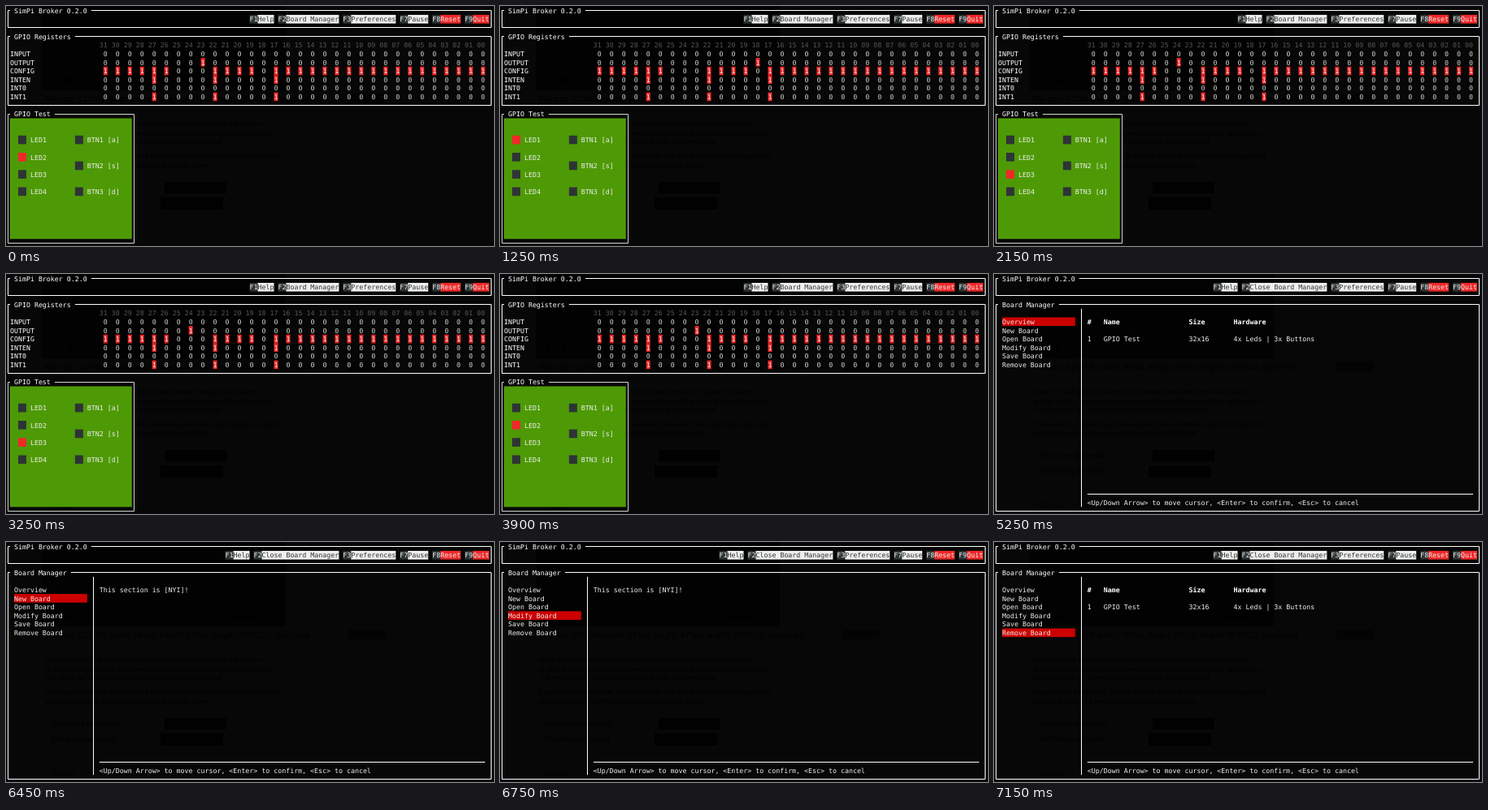
An HTML page that plays this animation: 600x296 px, repeating every 8000 ms.

```html
<!DOCTYPE html>
<html lang="en">
<head>
<meta charset="utf-8">
<title>GPIO terminal</title>
<style>
html, body { margin: 0; width: 100%; height: 100%; overflow: hidden; background: #070707; }
svg { display: block; width: 600px; height: 296px; }
text { white-space: pre; text-rendering: geometricPrecision; }
.term text { font: 8.292px "DejaVu Sans Mono", monospace; }
.term text.bold { font-weight: bold; }
.backdrop text { font-family: "Open Sans", sans-serif; }
</style>
</head>
<body>
<svg id="stage" viewBox="0 0 600 296"></svg>
<script>
const LOOP = 8000, COL = 4.992, ROW = 10.63, TOP = .3, BASELINE = 8.5;
const C = { bright: '#ffffff', white: '#eeeeec', light: '#d3d7cf', dim: '#555753', dark: '#2e3436',
            red: '#ef2929', select: '#cc0000', green: '#4e9a06' };

function add(parent, tag, attrs = {}, content) {
  const node = document.createElementNS('http://www.w3.org/2000/svg', tag);
  for (const key in attrs) node.setAttribute(key, attrs[key]);
  if (content !== undefined) node.textContent = content;
  parent.appendChild(node);
  return node;
}
const group = (parent, cls = '') => add(parent, 'g', { class: cls });
const show = (node, on) => node.setAttribute('visibility', on ? 'inherit' : 'hidden');

// Terminal helpers, all in character cells
const cellX = col => col * COL;
const cellY = row => TOP + row * ROW;
const midX = col => Math.floor(cellX(col + .5)) + .5;
const midY = row => Math.floor(cellY(row + .5)) + .5;
const label = (parent, col, row, str, fill = C.white, cls = '') =>
  add(parent, 'text', { x: cellX(col), y: cellY(row) + BASELINE, fill, class: cls }, str);
const block = (parent, col, row, cols, rows, fill) =>
  add(parent, 'rect', { x: cellX(col), y: cellY(row), width: cols * COL, height: rows * ROW, fill });
const line = (parent, d, stroke = C.bright) => add(parent, 'path', { d, fill: 'none', stroke });

function frame(parent, title, top, bottom, lastCol, stroke) {
  line(parent, `M${cellX(1)} ${midY(top)}H${midX(0)}V${midY(bottom)}H${midX(lastCol)}` +
               `V${midY(top)}H${cellX(title.length + 3)}`, stroke);
  label(parent, 2, top, title, C.bright);
}

function menu(parent, second) {
  const items = [['F1', 'Help'], ['F2', second], ['F3', 'Preferences'],
                 ['F7', 'Pause'], ['F8', 'Reset'], ['F9', 'Quit']];
  let col = 120 - items.reduce((sum, [, name]) => sum + name.length + 3, 0);
  for (const [key, name] of items) {
    const alert = key > 'F7';
    block(parent, col, 1, 2, 1, C.dark);
    label(parent, col, 1, key);
    block(parent, col + 2, 1, name.length, 1, alert ? C.red : C.white);
    label(parent, col + 2, 1, name, alert ? C.white : C.dark);
    col += name.length + 3;
  }
}

// The page that shimmers faintly through the terminal
function drawBackdrop(parent) {
  const box = (x, y, width, height, fill = '#010101') => add(parent, 'rect', { x, y, width, height, fill });
  const words = (x, y, size, str) => add(parent, 'text', { x, y, 'font-size': size, fill: '#000' }, str);
  box(0, 0, 600, 296, '#070707');
  box(44, 0, 300, 104, '#020202');
  add(parent, 'path', { d: 'M56 88l7 4-7 4z' });
  add(parent, 'circle', { cx: 78, cy: 92, r: 4 });
  add(parent, 'path', { d: 'M278 92h38M325 88h8v8h-8z', fill: 'none', stroke: '#000', 'stroke-width': 2 });
  words(48, 118, 9.5, 'File size: 3.21MiB, width: 961px, height: 471px, length: 00:00:22, type: mp4');
  box(421, 108, 46, 12, '#030303');
  words(48, 148, 8, 'Enter the start and end times in the boxes below, then press the button');
  words(48, 160, 8, 'or play the clip and use the current position to fill in both of the values here');
  words(48, 170, 8, 'The result will be shown below once the file has been read');
  words(48, 188, 8, 'If you want a smaller file, choose a lower size and frame rate before you start');
  words(48, 199, 8, 'and cut the clip to a few seconds so that it loads faster');
  words(55, 227, 9, 'Start time (seconds):');
  words(55, 246, 9, 'End time (seconds):');
  words(55, 288, 9, 'Output');
  box(195, 217, 76, 14);
  box(190, 236, 77, 15);
}

const svg = document.getElementById('stage');
drawBackdrop(group(svg, 'backdrop'));
const term = group(svg, 'term');
frame(term, 'SimPi Broker 0.2.0', 0, 2, 119);

// GPIO screen
const gpio = group(term);
menu(gpio, 'Board Manager');
frame(gpio, 'GPIO Registers', 3, 11, 119);
const bitCol = bit => 24 + 3 * (31 - bit);
const cells = {};
const interrupts = [27, 22, 17], outputs = [25, 24, 23, 18];
const registers = {
  INPUT: () => false,
  OUTPUT: () => false,
  CONFIG: bit => !outputs.includes(bit),
  INTEN: bit => interrupts.includes(bit),
  INT0: () => false,
  INT1: bit => interrupts.includes(bit)
};

function setBit(cell, on) {
  show(cell.back, on);
  cell.digit.textContent = on ? '1' : '0';
  cell.digit.setAttribute('fill', on ? C.white : C.light);
}

for (let bit = 0; bit < 32; bit++)
  label(gpio, bitCol(bit) - 1, 4, String(bit).padStart(2, '0'), C.dim);
Object.entries(registers).forEach(([name, isSet], i) => {
  label(gpio, 1, 5 + i, name, C.bright);
  cells[name] = Array.from({ length: 32 }, (_, bit) => {
    const cell = { back: block(gpio, bitCol(bit), 5 + i, 1, 1, C.red),
                   digit: label(gpio, bitCol(bit), 5 + i, '0') };
    setBit(cell, isSet(bit));
    return cell;
  });
});

frame(gpio, 'GPIO Test', 12, 27, 31, C.light);
block(gpio, 1, 13, 30, 14, C.green);
function lamp(col, row, name) {
  label(gpio, col + 3, row, name);
  return block(gpio, col, row, 2, 1, C.dark);
}
const leds = [18, 23, 24, 25].map((bit, i) => ({ bit, node: lamp(3, 15 + 2 * i, 'LED' + (i + 1)) }));
const buttons = [
  { bit: 22, key: 'a', from: 1650, to: 1850 },
  { bit: 27, key: 's', from: 2450, to: 2650 },
  { bit: 17, key: 'd', from: 3700, to: 3850 }
];
buttons.forEach((b, i) => { b.node = lamp(17, 15 + 3 * i, `BTN${i + 1} [${b.key}]`); });

// Board manager screen
const manager = group(term);
menu(manager, 'Close Board Manager');
frame(manager, 'Board Manager', 3, 27, 119);
line(manager, `M${midX(21)} ${cellY(4)}V${cellY(27)}M${cellX(23)} ${midY(25)}H${cellX(118)}`);
label(manager, 23, 26, '<Up/Down Arrow> to move cursor, <Enter> to confirm, <Esc> to cancel');
const cursor = block(manager, 2, 5, 18, 1, C.select);
['Overview', 'New Board', 'Open Board', 'Modify Board', 'Save Board', 'Remove Board']
  .forEach((name, i) => label(manager, 2, 5 + i, name));
const table = group(manager);
[[23, '#', '1'], [27, 'Name', 'GPIO Test'], [48, 'Size', '32x16'],
 [59, 'Hardware', '4x Leds | 3x Buttons']].forEach(([col, head, value]) => {
  label(table, col, 5, head, C.bright, 'bold');
  label(table, col, 7, value);
});
const notice = label(manager, 23, 5, 'This section is [NYI]!');

// Timeline: [time, value] pairs, each held until the next
const ledSteps = [[0, 1], [350, 2], [800, 3], [1250, 0], [1700, 1], [2150, 2],
                  [2650, 3], [3250, 2], [3900, 1], [4350, 0], [4800, 3]];
const cursorSteps = [[0, 0], [6450, 1], [6550, 2], [6750, 3], [6950, 4], [7150, 5]];
const MANAGER_OPENS = 5250;
const valueAt = (steps, t) => steps.filter(([start]) => start <= t).pop()[1];

function render(t) {
  const open = t >= MANAGER_OPENS;
  show(gpio, !open);
  show(manager, open);
  const lit = valueAt(ledSteps, t);
  leds.forEach(({ bit, node }, i) => {
    node.setAttribute('fill', i === lit ? C.red : C.dark);
    setBit(cells.OUTPUT[bit], i === lit);
  });
  for (const { bit, node, from, to } of buttons) {
    const pressed = t >= from && t < to;
    node.setAttribute('fill', pressed ? C.red : C.dark);
    setBit(cells.INPUT[bit], pressed);
  }
  const item = valueAt(cursorSteps, t);
  const listed = item === 0 || item === 5;
  cursor.setAttribute('y', cellY(5 + item));
  show(table, listed);
  show(notice, !listed);
}

const begin = performance.now();
function tick() {
  render((performance.now() - begin) % LOOP);
  requestAnimationFrame(tick);
}
tick();
</script>
</body>
</html>
```
